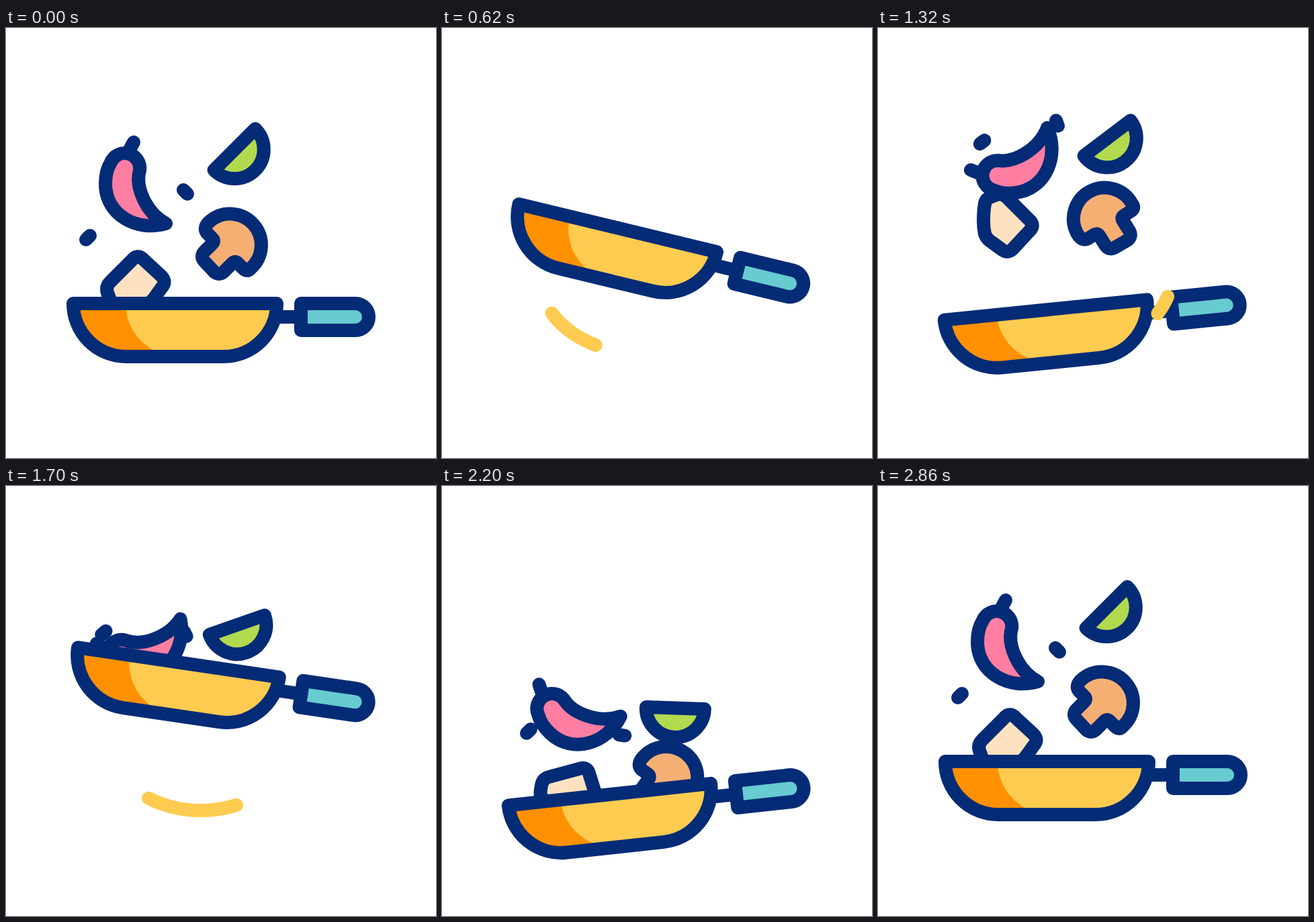
These frames come from a looping animation (640x640 px, 3.04 s). An HTML page:

```html
<!DOCTYPE html>
<html lang="en">
<head>
<meta charset="utf-8">
<title>Tossing pan</title>
<style>
  html, body { margin: 0; width: 100%; height: 100%; overflow: hidden; background: #fff; }
  svg { display: block; width: 100%; height: 100%; }
  .ink { stroke: #042b76; stroke-width: 20; stroke-linecap: round; stroke-linejoin: round; fill: none; }
  .streak { stroke: #fdcb50; stroke-width: 20; stroke-linecap: round; fill: none; }
</style>
</head>
<body>
<svg viewBox="0 0 640 640">
  <defs>
    <clipPath id="aboveRim"><rect id="rim" x="-400" y="-800" width="1500" height="1210"/></clipPath>
  </defs>

  <path class="streak" id="sparks"/>

  <g class="ink" clip-path="url(#aboveRim)">
    <g id="cube">
      <path fill="#fee1c0" d="M-38 1L-6 -31Q3 -42 12 -32L37 -9Q47 0 39 9L26 27Q22 32 16 34Q7 36 -3 36Q-18 36 -29 34Q-36 33 -39 25L-42 17Q-45 8 -38 1Z"/>
    </g>
    <g id="mushroom">
      <path fill="#f6af73" transform="translate(-336 -321)" d="M303 288A46 46 0 1 1 364 358Q359 364 353 358L345 350Q341 346 337 350L324 363Q317 369 310 363L295 347Q289 340 295 333L307 321Q311 317 307 313L299 305Q293 297 303 288Z"/>
    </g>
    <g id="chili">
      <g transform="translate(-201 -237)">
        <path d="M190 170L184 181"/>
        <path fill="#ff7ea1" d="M156 200A22.5 22.5 0 0 1 199 212C192 236 208 275 238 291C195 304 148 278 148 232C148 219 151 208 156 200Z"/>
      </g>
    </g>
    <g id="lime">
      <path fill="#b1da4e" d="M-43.5 -9.5H43.5A43.5 43.5 0 0 1 -43.5 -9.5Z"/>
    </g>
    <g id="crumbRight"><path d="M-3 -3L3 3"/></g>
    <g id="crumbLeft"><path d="M3 -3L-3 3"/></g>
  </g>

  <g id="pan">
    <path fill="#fdcb50" d="M100 410H403A79 79 0 0 1 324 489H179A79 79 0 0 1 100 410Z"/>
    <path fill="#ff9100" d="M100 410H178A79 79 0 0 0 257 489H179A79 79 0 0 1 100 410Z"/>
    <g class="ink">
      <path d="M402 430H439"/>
      <path d="M100 410H403A79 79 0 0 1 324 489H179A79 79 0 0 1 100 410Z"/>
      <path fill="#67cbd1" d="M439 410H520A20 20 0 0 1 520 450H439Z"/>
    </g>
  </g>

  <path class="streak" id="swoosh"/>
</svg>

<script>
const LOOP = 3040, START = 220, END = 2860;
const PIVOT = { x: 390, y: 437 }, RIM = 410;

const el = id => document.getElementById(id);
const rad = deg => deg * Math.PI / 180;
const clamp = u => Math.min(1, Math.max(0, u));
const span = (t, from, to) => clamp((t - from) / (to - from));
const smooth = u => u * u * (3 - 2 * u);
const mix = (a, b, k) => a.map((v, i) => v + (b[i] - v) * k);

// The pan swings smoothly between these turning points, its tilt a little behind its lift.
const swing = turns => t => turns.slice(1).reduce((value, [time, next], i) =>
  value + (next - turns[i][1]) * smooth(span(t, turns[i][0], time)), turns[0][1]);
const panLift = swing([[START, 0], [640, -81], [1170, 20], [1760, -132], [2220, 35], [END, 0]]);
const panTilt = swing([[START, 0], [760, 16.3], [1230, -6.8], [1820, 10.2], [2240, -6.6], [END, 0]]);

// Poses are [x, y, angle]; in the pan a food lies at a depth below the rim.
const foods = {
  cube: { rest: [193, 377, 0], toss: [193, 291, 90], hop: [193, 451, 30], depth: 60, lie: 60 },
  mushroom: { rest: [336, 321, 0], toss: [336, 282, -77], hop: [336, 432, -9], depth: 140, lie: -50 },
  chili: { rest: [201, 237, 0], toss: [203, 193, -97], hop: [201, 333, -47], depth: 65, lie: -55 },
  lime: { rest: [347, 187.5, -45], toss: [347, 172.5, -37], hop: [347, 340, 2], depth: 45, lie: 24 },
  crumbRight: { rest: [267, 244, 0], toss: [266.5, 143, 25], hop: [268, 371, -37], depth: 143, lie: 0 },
  crumbLeft: { rest: [122, 312, 0], toss: [155, 171, 7], hop: [129, 365, 0], depth: 92, lie: 0 }
};

function inPan({ rest: [x], depth, lie }, t) {
  const a = rad(panTilt(t));
  const rimY = PIVOT.y + panLift(t) + (x - PIVOT.x) * Math.tan(a) + (RIM - PIVOT.y) / Math.cos(a);
  return [x, rimY + depth, lie];
}

function foodPose(food, t) {
  const lying = inPan(food, t);
  if (t < 700) return mix(food.rest, lying, span(t, START, 520) ** 2);
  if (t < 2000) return mix(lying, food.toss, Math.max(0, 1.04 - ((t - 1415) / 495) ** 2));
  if (t < 2200) return mix(lying, food.hop, span(t, 2040, 2200));
  return mix(food.hop, food.rest, 1 - (1 - span(t, 2200, END)) ** 2.5);
}

// A dash that travels along a track, longest halfway; returns its two ends.
function dash(t, { mid, half, centre, reach, length }) {
  const u = (t - mid) / half;
  if (Math.abs(u) >= 1) return null;
  const at = centre + reach * u, d = length / 2 * Math.cos(u * Math.PI / 2);
  return [at - d, at + d];
}

const onEllipse = (cx, cy, rx, ry, deg) =>
  `${cx + rx * Math.cos(rad(deg))} ${cy + ry * Math.sin(rad(deg))}`;

const sweeps = [
  { mid: 780, half: 300, centre: 93.5, reach: -70, length: 50 },
  { mid: 1690, half: 440, centre: 93.5, reach: 80, length: 52 }
];

function swooshPath(t) {
  const ends = sweeps.map(s => dash(t, s)).find(Boolean);
  if (!ends) return '';
  const [a, b] = ends.map(deg => onEllipse(290, 357, 150, 126, deg));
  return `M${a}A150 126 0 0 1 ${b}`;
}

function sparkPath(t) {
  const ends = dash(t, { mid: 940, half: 100, centre: 134, reach: 30, length: 36 });
  if (!ends) return '';
  return [-101, -76.5, -52].map(deg =>
    'M' + ends.map(r => onEllipse(241, 356, r, r, deg)).join('L')).join('');
}

function draw(now) {
  const t = now % LOOP;
  const pose = `translate(0 ${panLift(t)}) rotate(${panTilt(t)} ${PIVOT.x} ${PIVOT.y})`;
  el('pan').setAttribute('transform', pose);
  el('rim').setAttribute('transform', pose);
  for (const id in foods) {
    const [x, y, angle] = foodPose(foods[id], t);
    el(id).setAttribute('transform', `translate(${x} ${y}) rotate(${angle})`);
  }
  el('swoosh').setAttribute('d', swooshPath(t));
  el('sparks').setAttribute('d', sparkPath(t));
}

let start;
function tick(now) {
  start ??= now;
  draw(now - start);
  requestAnimationFrame(tick);
}
draw(0);
requestAnimationFrame(tick);
</script>
</body>
</html>
```
